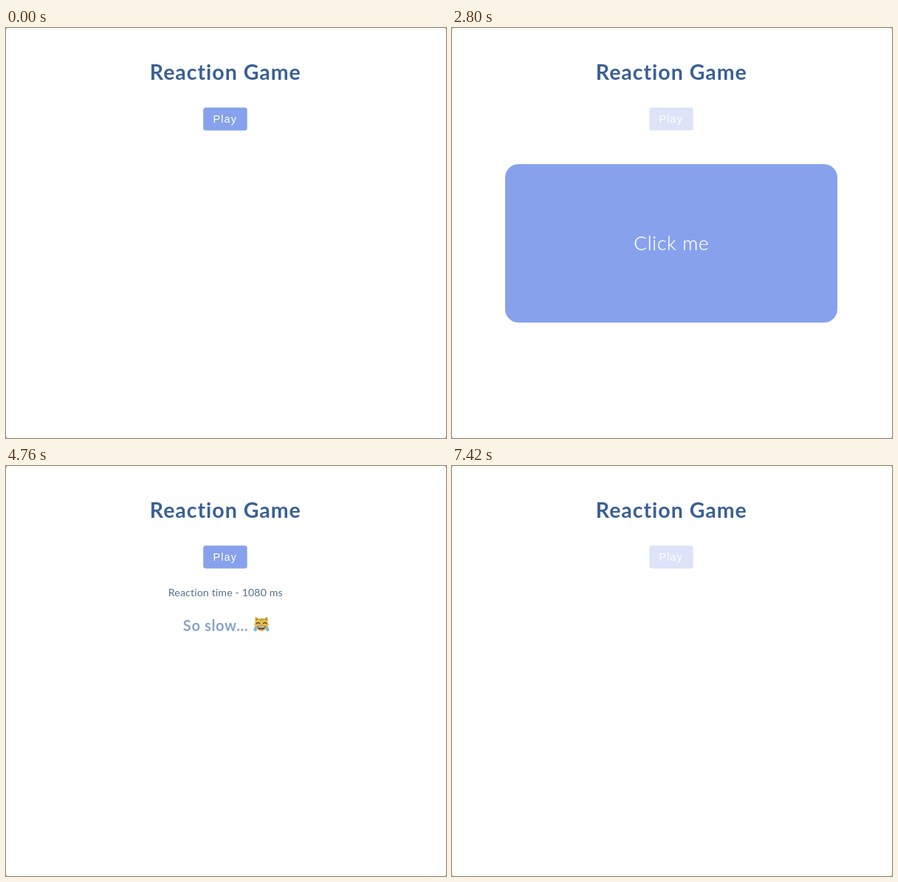
An HTML page that plays this animation: 596x554 px, repeating every 8 s.

```html
<!DOCTYPE html>
<html lang="en">
<head>
<meta charset="utf-8">
<title>Reaction Game</title>
<style>
  html, body { margin: 0; width: 100%; height: 100%; overflow: hidden; background: #fff; }
  svg { display: block; width: 596px; height: 554px; }
  text { font-family: Lato, "Open Sans", sans-serif; white-space: pre; }
  .title { font-size: 28.5px; font-weight: 700; letter-spacing: .98px; fill: #3a6096; }
  .play { font-family: "Liberation Sans", Arial, sans-serif; font-size: 14.4px; letter-spacing: 1.1px; fill: #fff; }
  .click { font-size: 26px; font-weight: 300; letter-spacing: .85px; fill: #fff; stroke: #fff; stroke-width: .3px; }
  .time { font-size: 14.2px; letter-spacing: .12px; fill: #557093; }
  .verdict { font-size: 20px; font-weight: 700; letter-spacing: .62px; fill: #8aa4cc; }
</style>
</head>
<body>
<svg viewBox="0 0 596 554">
  <rect width="596" height="554" fill="#fff"/>
  <path d="M0 0h1v1h-1zM595 0h1v1h-1zM0 553h1v1h-1zM595 553h1v1h-1z" fill="#777"/>
  <text class="title" x="297.3" y="69.5" text-anchor="middle">Reaction Game</text>

  <g id="button">
    <rect x="267.2" y="107.6" width="59.5" height="31" rx="3.5" fill="#87a1ed"/>
    <text class="play" x="280.6" y="128">Play</text>
  </g>

  <g id="target">
    <rect x="72" y="184" width="450" height="214" rx="18" fill="#87a1ed"/>
    <text class="click" x="297.3" y="299.5" text-anchor="middle">Click me</text>
  </g>

  <g id="result">
    <text class="time" x="297.3" y="176.3" text-anchor="middle">Reaction time - 1080 ms</text>
    <text class="verdict" x="284.1" y="223.3" text-anchor="middle">So slow...</text>
    <g transform="translate(335 202.6)">
      <path d="M2.6 1.2Q3.4 .4 8 3.6Q11 2.9 14 3.6Q18.6 .4 19.4 1.2Q20.3 4 19.6 8Q21.2 11 20.3 14Q18 20.4 11 20.4Q4 20.4 1.7 14Q.8 11 2.4 8Q1.7 4 2.6 1.2Z" fill="#e6c052"/>
      <path d="M3.5 2.6L6.5 4.6L3.8 7ZM18.5 2.6L15.5 4.6L18.2 7Z" fill="#a87b48"/>
      <path d="M8.6 3.6L9.4 6.2M11 3.3V6.6M13.4 3.6L12.6 6.2" stroke="#a37a38" stroke-width=".9"/>
      <path d="M4.1 10.4Q6 7.8 8.5 10.3M13.5 10.3Q16 7.8 17.9 10.4" fill="none" stroke="#45351f" stroke-width="1.3" stroke-linecap="round"/>
      <path d="M9.8 11.2H12.2L11 12.5Z" fill="#a8614f"/>
      <path d="M5.4 13.2Q8 14.6 11 13.4Q14 14.6 16.6 13.2Q16 19 11 19Q6 19 5.4 13.2Z" fill="#4b3022"/>
      <path d="M6.4 14Q8.5 14.8 11 13.8Q13.5 14.8 15.6 14L15.1 15.6H6.9Z" fill="#fff"/>
      <path d="M8 17.9Q11 15.8 14 17.9Q11 19.6 8 17.9Z" fill="#c9706a"/>
      <path d="M4.6 13.4Q.2 15.5.5 18.8Q1 21.3 3.4 20.7Q6 19.5 4.6 13.4ZM17.4 13.4Q21.8 15.5 21.5 18.8Q21 21.3 18.6 20.7Q16 19.5 17.4 13.4Z" fill="#7ab8e2"/>
    </g>
  </g>
</svg>
<script>
  const LOOP = 8000;
  // start time, scene
  const steps = [
    [0, "ready"],
    [560, "wait"],
    [2800, "go"],
    [3920, "done"],
    [5670, "wait"]
  ];
  const [button, target, result] = ["button", "target", "result"].map(id => document.getElementById(id));
  const show = (el, on) => el.setAttribute("visibility", on ? "visible" : "hidden");

  function draw(time) {
    const scene = steps.filter(([start]) => start <= time).pop()[1];
    const disabled = scene === "wait" || scene === "go";
    button.setAttribute("opacity", disabled ? 0.28 : 1);
    show(target, scene === "go");
    show(result, scene === "done");
  }

  const begin = performance.now();
  function tick() {
    draw((performance.now() - begin) % LOOP);
    requestAnimationFrame(tick);
  }
  tick();
</script>
</body>
</html>
```
